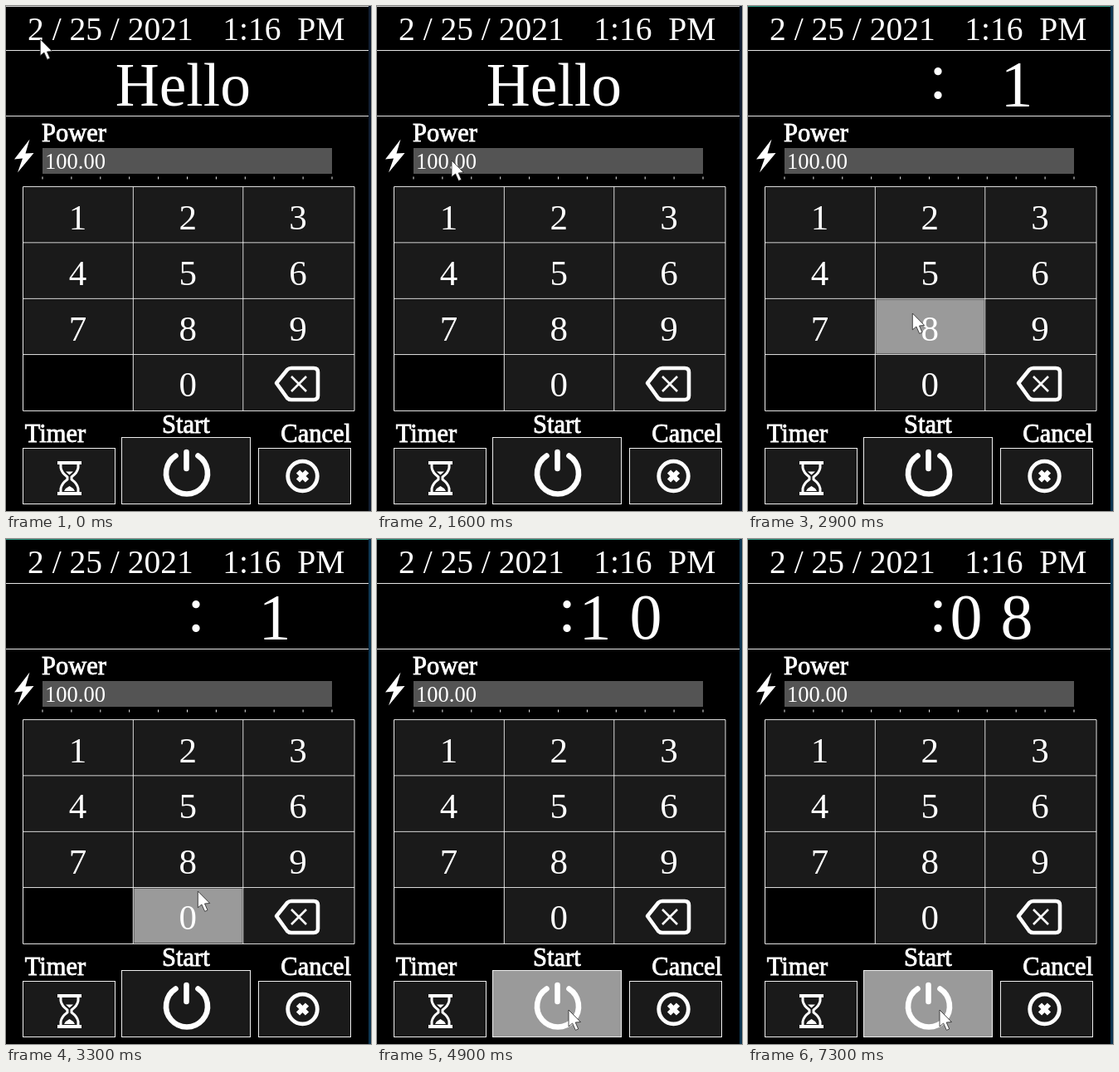
Animation of 440x608 px, one loop 8 s. Source, as an HTML page:

```html
<!DOCTYPE html>
<html lang="en">
<head>
<meta charset="utf-8">
<title>Keypad timer</title>
<style>
html, body { margin: 0; width: 100%; height: 100%; overflow: hidden; background: #000; }
svg { display: block; width: 100%; height: 100%; }
text { font-family: "Liberation Serif", "Times New Roman", serif; fill: #fff; white-space: pre; }
.label { font-size: 30.5px; stroke: #fff; stroke-width: .9px; }
.digit { font-size: 43px; text-anchor: middle; }
.clock { font-size: 39.5px; }
.count { font-size: 78px; text-anchor: middle; }
.icon { fill: none; stroke: #fff; stroke-linejoin: round; }
</style>
</head>
<body>
<svg viewBox="0 0 440 608">
  <rect width="440" height="608" fill="#000"/>
  <rect id="side" x="437" width="3" height="608"/>
  <rect id="top" width="437" height="1"/>
  <path d="M0 53.5H437M0 132.5H437" stroke="#e4e4e4"/>
  <text class="clock" x="26" y="40.6">2 / 25 / 2021</text>
  <text class="clock" x="261.3" y="40.6">1:16&#160;&#160;PM</text>

  <text id="hello" x="131.8" y="120" font-size="73.4">Hello</text>
  <g id="timer">
    <text class="count" x="229" y="110.5">:</text>
    <text class="count" id="tens" x="263" y="120"></text>
    <text class="count" id="ones" x="324" y="120"></text>
  </g>

  <text class="label" x="43" y="163">Power</text>
  <path d="M28.5 160.500L10 184.500L20 183.500L14 200.500L33.500 177L23.500 177.500Z" fill="#fff"/>
  <rect x="44" y="171" width="349" height="31" fill="#545454"/>
  <text x="47" y="196" font-size="26.5">100.00</text>
  <path id="ticks" stroke="#eee"/>

  <g id="keys"></g>
  <path id="grid" fill="none" stroke="#eee"/>
  <g id="digits"></g>
  <g class="icon">
    <path d="M326 454L339 438Q341 436 344 436H371Q376 436 376 441V469Q376 474 371 474H344Q341 474 339 472Z" stroke-width="4.600"/>
    <path d="M344 446L362 464M362 446L344 464" stroke-width="2.600"/>
  </g>

  <text class="label" x="22.8" y="525">Timer</text>
  <text class="label" x="188" y="514">Start</text>
  <text class="label" x="331.3" y="525">Cancel</text>
  <g class="icon">
    <path d="M62 550H91M62 587H91" stroke-width="4"/>
    <path d="M66 551V556Q67 562 74 567V570Q67 575 66 581V586M87 551V556Q86 562 79 567V570Q86 575 87 581V586" stroke-width="3"/>
    <path d="M70 584Q72 580 76.500 578Q81 580 83 584ZM72 560.500H81L76.500 564.500Z" fill="#fff" stroke="none"/>
    <path d="M204.500 541.500A25 25 0 1 0 231.500 541.500M217.500 537V557" stroke-width="6.600" stroke-linecap="round"/>
    <circle cx="357.500" cy="566" r="17.800" stroke-width="4.800"/>
    <path d="M352 560.500L363 571.500M363 560.500L352 571.500" stroke-width="6"/>
  </g>

  <path id="cursor" d="M0 0V19.800L4.600 16L8.400 24.400L11.700 22.900L8.200 15L14.400 14.500Z" fill="#fff" stroke="#222" stroke-width=".8"/>
</svg>
<script>
const NS = "http://www.w3.org/2000/svg";
const LOOP = 8000, STEP = 100;
const COLS = [20.5, 153.3, 285.8, 420], ROWS = [217.6, 284.9, 352.3, 419.6, 487.4];
const $ = id => document.getElementById(id);

function add(parent, tag, attrs) {
  const el = document.createElementNS(NS, tag);
  for (const name in attrs) el.setAttribute(name, attrs[name]);
  return parent.appendChild(el);
}

// Hover areas: number pad, then the three framed buttons
const areas = [];
function addArea(x, y, w, h, stroke = "none") {
  const el = add($("keys"), "rect", { x, y, width: w, height: h, stroke });
  areas.push({ el, x, y, w, h });
}

["1", "2", "3", "4", "5", "6", "7", "8", "9", "", "0", "back"].forEach((key, i) => {
  const col = i % 3, row = Math.floor(i / 3);
  if (!key) return;
  const x = COLS[col], y = ROWS[row];
  addArea(x + 1, y + 1, COLS[col + 1] - x - 2, ROWS[row + 1] - y - 2);
  if (key === "back") return;
  add($("digits"), "text", { class: "digit", x: 86.5 + col * 132.8, y: 268.5 + row * 67.2 }).textContent = key;
});
addArea(20.5, 532.5, 111, 67, "#eee");
addArea(139.5, 519.5, 155, 80, "#eee");
addArea(304.5, 532.5, 111, 67, "#eee");

$("grid").setAttribute("d",
  COLS.map(x => `M${x} ${ROWS[0]}V${ROWS[4]}`).join("") +
  ROWS.map(y => `M${COLS[0]} ${y}H${COLS[3]}`).join(""));
$("ticks").setAttribute("d",
  Array.from({ length: 11 }, (_, i) => `M${44 + i * 34.9} 205.500v3`).join(""));

// Pointer path: time, x, y
const path = [
  [0, 41.3, 40], [1200, 41.3, 40], [1300, 46, 58], [1500, 72, 140], [1700, 108, 232], [1800, 114.3, 245],
  [2500, 114.3, 245], [2700, 138, 290], [2800, 172, 340], [2900, 198.3, 370], [3000, 205, 381],
  [3100, 205, 381], [3200, 221, 407], [3300, 231.3, 424], [3400, 235, 434], [3500, 236, 440],
  [4300, 236, 440], [4400, 237, 518], [4600, 237, 518], [4700, 234, 564],
  [4800, 234, 564], [4900, 231, 567], [LOOP, 231, 567]
];

function pointer(t) {
  const i = path.findIndex(p => p[0] > t);
  const [t0, x0, y0] = path[i - 1], [t1, x1, y1] = path[i];
  const k = (t - t0) / (t1 - t0);
  return [x0 + (x1 - x0) * k, y0 + (y1 - y0) * k];
}

function reading(t) {
  if (t < 2400) return null;
  if (t < 3900) return " 1";
  return t < 6200 ? "10" : t < 7300 ? "09" : "08";
}

function draw(ms) {
  const t = Math.floor((ms % LOOP) / STEP) * STEP;
  const [x, y] = pointer(t);
  $("cursor").setAttribute("transform", `translate(${x} ${y})`);
  for (const a of areas) {
    const over = x >= a.x && x < a.x + a.w && y >= a.y && y < a.y + a.h;
    a.el.setAttribute("fill", over ? "#9a9a9a" : "#1a1a1a");
  }
  const value = reading(t);
  $("hello").style.display = value ? "none" : "";
  $("timer").style.display = value ? "" : "none";
  $("tens").textContent = value ? value[0].trim() : "";
  $("ones").textContent = value ? value[1] : "";
  $("top").setAttribute("fill", value ? "#2f9c86" : "#d0d0d0");
  $("side").setAttribute("fill", value ? "#0d3550" : "#101d30");
}

const start = performance.now();
function tick() {
  draw(performance.now() - start);
  requestAnimationFrame(tick);
}
tick();
</script>
</body>
</html>
```
